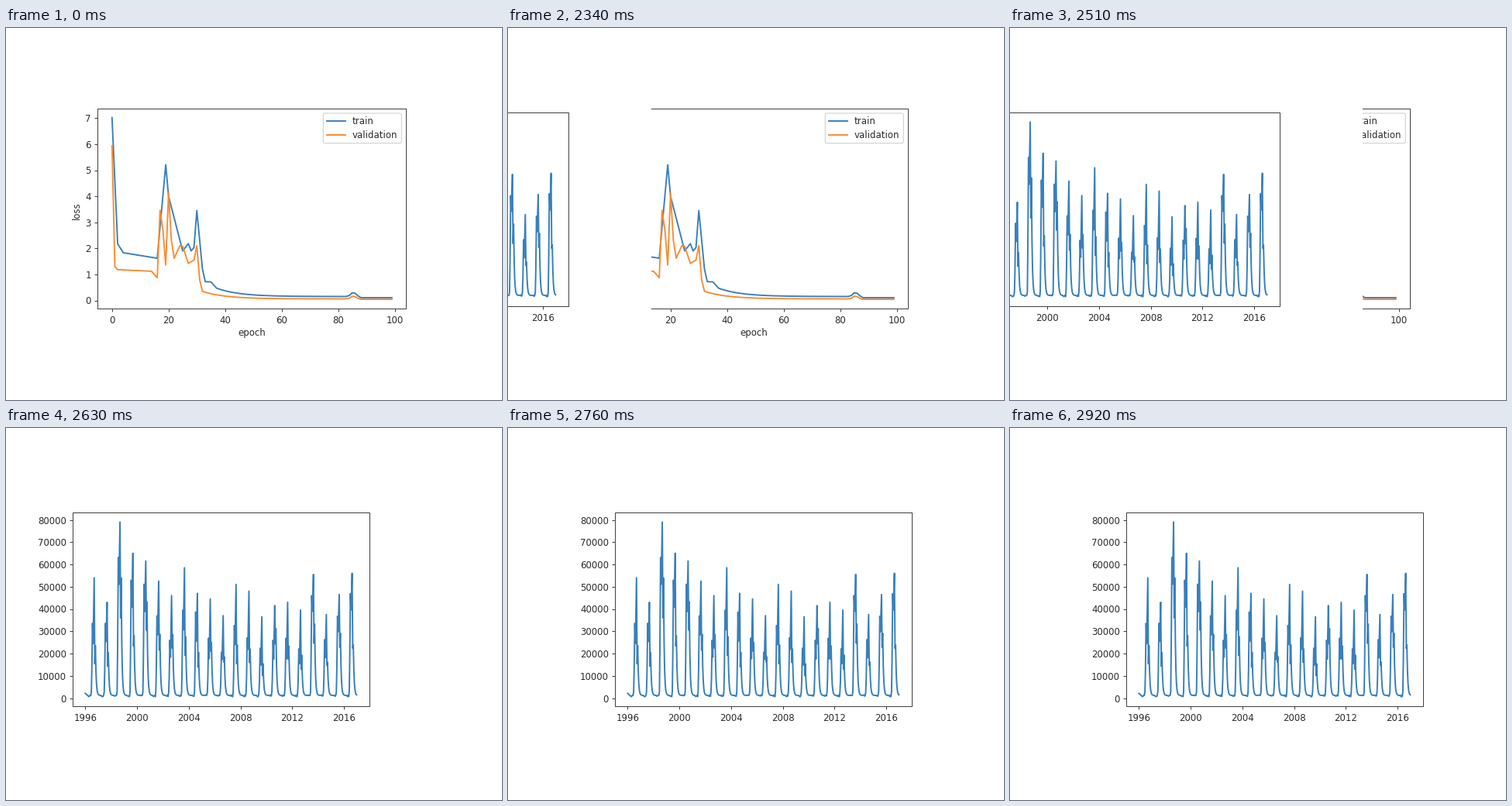
A matplotlib script for the animation above (5050 ms loop, 640 px wide and 480 px high).

```python
import math
import random

import matplotlib.pyplot as plt
import numpy as np
from matplotlib.animation import FuncAnimation
from matplotlib.patches import FancyBboxPatch, Rectangle

W, H = 640, 480
TICK_MS, LOOP_MS = 10, 5050
SLIDE_START = 200          # in ticks
PT = 0.72                  # points per pixel at 100 dpi
INK, EDGE = "#2a2a2a", "#404040"
BLUE, ORANGE = "#3880bb", "#fb8b30"

fig = plt.figure(figsize=(6.4, 4.8), dpi=100, facecolor="white")


def make_slide(z):
    ax = fig.add_axes([0, 0, 1, 1], zorder=z)
    ax.set(xlim=(0, W), ylim=(H, 0))
    ax.set_axis_off()
    ax.add_patch(Rectangle((0, 0), W, H, fc="white", lw=0, zorder=0))
    return ax


def label(ax, x, y, s, size=11.8, **kw):
    ax.text(x, y, s, fontsize=size * PT, color=INK, **kw)


def line(ax, x, y, color, width, **kw):
    ax.plot(x, y, color=color, lw=width * PT, **kw)


def draw_frame(ax, box, scale, xticks, yticks):
    """Plot border with ticks; xticks and yticks are (pixel, text) pairs."""
    left, top, right, bottom = box
    tick, gap = 3.5 * scale, 7 * scale
    ax.add_patch(Rectangle((left, top), right - left, bottom - top,
                           fill=False, ec=EDGE, lw=PT, zorder=4))
    for x, s in xticks:
        line(ax, [x, x], [bottom, bottom + tick], EDGE, 1, solid_capstyle="butt")
        label(ax, x, bottom + gap + 0.9, s, ha="center", va="top")
    for y, s in yticks:
        line(ax, [left - tick, left], [y, y], EDGE, 1, solid_capstyle="butt")
        label(ax, left - gap, y, s, ha="right", va="center_baseline")


# Loss chart: key points (epoch, loss) until training settles, then a decay
TRAIN = [(0, 7.02), (2, 2.17), (4, 1.83), (16, 1.62), (19, 5.21), (20, 4.0),
         (25, 1.9), (27, 2.18), (28, 1.9), (29, 2.03), (30, 3.45), (32, 1.2),
         (33, 0.72), (35, 0.71), (37, 0.47)]
VALID = [(0, 5.94), (1, 1.3), (2, 1.18), (14, 1.12), (16, 0.87), (17, 3.46),
         (18, 2.7), (19, 1.36), (20, 4.12), (21, 2.3), (22, 1.62), (24, 2.1),
         (25, 2.08), (27, 1.42), (29, 1.55), (30, 2.1), (31, 0.8), (32, 0.35)]


def epoch_x(e):
    return 136.8 + 3.647 * e


def loss_y(v):
    return 351.5 - 33.6 * v


def loss_curve(ax, keys, floor, bump, color):
    e = np.arange(100)
    last, level = keys[-1]
    decay = floor + (level - floor) * np.exp((last - e) / 8)
    late = bump * np.exp(-((e - 85.4) / 1.2) ** 2) - 0.3 * floor * (e > 87)
    loss = np.where(e <= last, np.interp(e, *zip(*keys)), decay + late)
    line(ax, epoch_x(e), loss_y(loss), color, 1.9, zorder=3)


def draw_loss(ax):
    draw_frame(ax, (118, 104, 516, 362), 1.189,
               [(epoch_x(e), str(e)) for e in range(0, 101, 20)],
               [(loss_y(v), str(v)) for v in range(8)])
    label(ax, 317.3, 387.3, "epoch", ha="center", va="top")
    label(ax, 97.9, 235.5, "loss", rotation=90, ha="right", va="center")
    loss_curve(ax, TRAIN, 0.15, 0.16, BLUE)
    loss_curve(ax, VALID, 0.06, 0.11, ORANGE)
    ax.add_patch(FancyBboxPatch((409.3, 110), 101, 38.6, fc="white",
                                ec="#d0d0d0", lw=1.1 * PT, zorder=5,
                                boxstyle="round,pad=0,rounding_size=2.4"))
    for y, name, color in ((120, "train", BLUE), (138, "validation", ORANGE)):
        line(ax, [414.3, 438.1], [y, y], color, 1.9, zorder=6)
        label(ax, 447.1, y + 4.4, name, va="baseline", zorder=6)


# Seasonal chart: highest count of each year, in thousands
PEAKS = [54, 43, 79, 65, 61.5, 52.5, 46, 58.5, 47, 44.5, 37,
         51, 48, 36.5, 41.5, 43, 39.5, 55.5, 37.5, 46.5, 56]


def year_x(n):
    return 166.4 + 16.69 * n


def count_y(v):
    return 348.5 - 2.875 * v


def season_points():
    """Each year: flat start, shoulder, peak, second shoulder, long tail."""
    rng = random.Random(4)
    points = [(year_x(0), 2.1)]
    for n, peak in enumerate(PEAKS):
        top = year_x(n) + 11.4 - 0.05 * n
        first = peak * rng.uniform(0.55, 0.85)
        second = peak * rng.uniform(0.4, 0.75)
        rise = [(-3.7, 2.8), (-3.1, 0.34 * first), (-2.2, first),
                (-1.4, first * rng.uniform(0.65, 0.85)), (0, peak),
                (0.8, second * rng.uniform(0.6, 0.95)), (1.5, second)]
        quiet = [(d, 1 + rng.uniform(-0.4, 0.4)) for d in (-6.8, -5.9, -5.1, -4.4)]
        tail = [(d, 1.2 + 0.45 * second * math.exp((2.3 - d) / 0.95))
                for d in np.arange(2.3, 9, 0.7)]
        points += [(top + d, v) for d, v in quiet + rise + tail]
    return sorted(p for p in points if p[0] <= year_x(21))


def draw_season(ax):
    draw_frame(ax, (150, 109, 533, 359), 1.15,
               [(year_x(n), str(1996 + n)) for n in range(0, 21, 4)],
               [(count_y(v), str(v * 1000)) for v in range(0, 81, 10)])
    x, v = np.array(season_points()).T
    line(ax, x, count_y(v), BLUE, 1.95, solid_joinstyle="round", zorder=3)


def ease(t):
    return 4 * t ** 3 if t < 0.5 else 1 - 4 * (1 - t) ** 3


def progress(tick):
    """The slide advances 24 times a second and takes one second."""
    j = tick - SLIDE_START
    if j < 0:
        return 0
    step = max(0, math.ceil(6 * j / 25) - 1)
    return ease(min(1, (step + 2) / 24))


loss_slide, season_slide = make_slide(1), make_slide(2)
draw_loss(loss_slide)
draw_season(season_slide)


def update(tick):
    p = progress(tick)
    season_slide.set_position([round(W * (p - 1)) / W, 0, 1, 1])
    season_slide.set_visible(p > 0)
    loss_slide.set_visible(p < 1)
    return loss_slide, season_slide


def reset():
    return update(0)


anim = FuncAnimation(fig, update, frames=LOOP_MS // TICK_MS, init_func=reset,
                     interval=TICK_MS, repeat=True, repeat_delay=0, blit=False)
plt.show()
```
